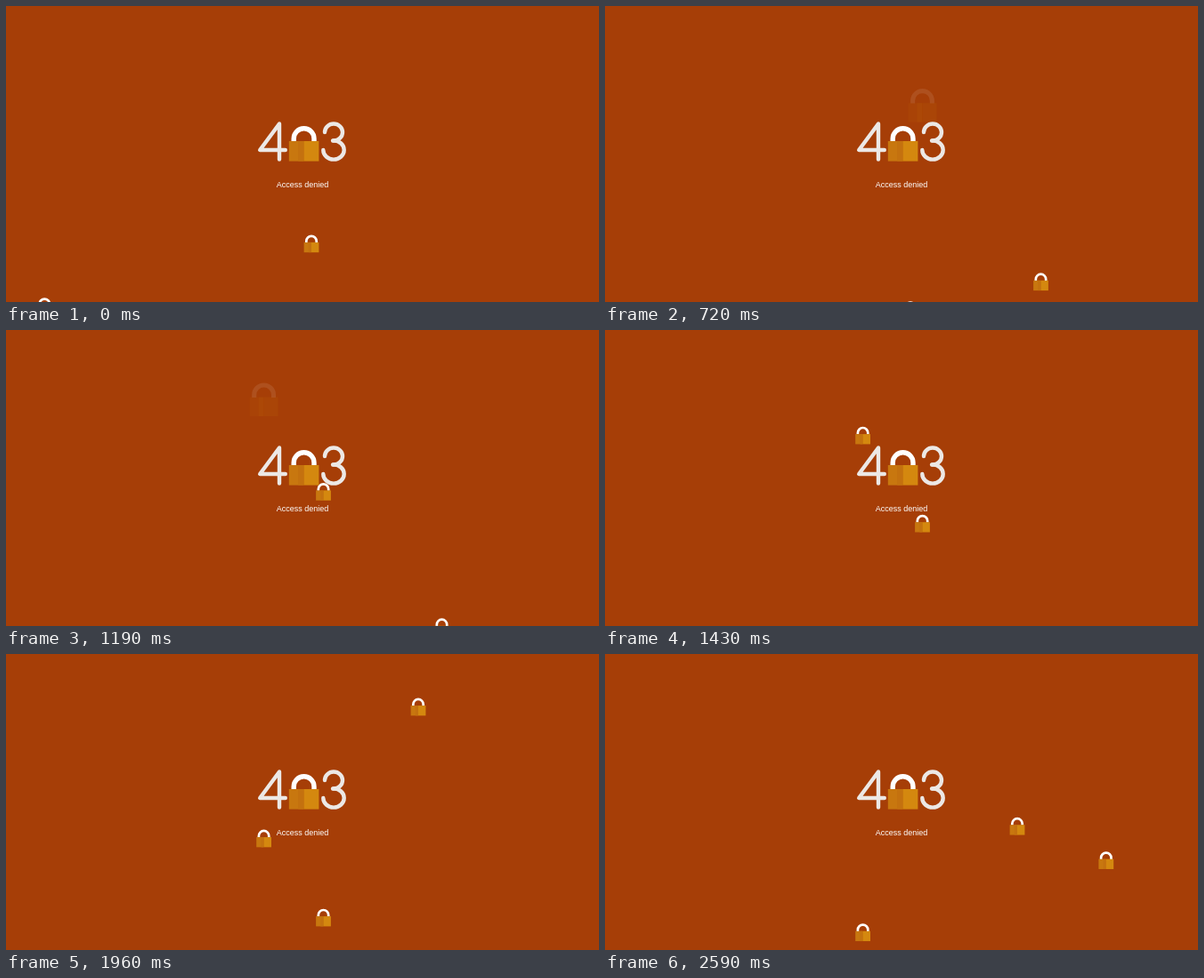
These frames come from a looping animation (666x333 px, 2.69 s). An HTML page with a canvas:

```html
<!DOCTYPE html>
<html lang="en">
<head>
<meta charset="utf-8">
<title>403</title>
<style>
  html, body { margin: 0; width: 100%; height: 100%; overflow: hidden; background: #a63e07; }
  canvas { display: block; }
</style>
</head>
<body>
<canvas id="stage" width="666" height="333"></canvas>
<script>
const ctx = document.getElementById('stage').getContext('2d');
const LOOP = 2690, FALL = 1800, FADE = 210, END_Y = 377;

// Each falling lock: spawn time in ms, centre x, starting centre y
const locks = [
  { born: -745, x: 343, y: 190 },
  { born: -250, x: 43.3, y: 332 },
  { born: 225, x: 489.5, y: 285 },
  { born: 700, x: 356.5, y: 109 },
  { born: 1170, x: 289.6, y: 75 },
  { born: 1650, x: 463, y: -6.5 },
  { born: 2120, x: 562.8, y: 181 }
];

function drawLock(x, y, scale, alpha = 1) {
  ctx.save();
  ctx.translate(x, y);
  ctx.scale(scale, scale);
  ctx.globalAlpha = alpha;

  ctx.strokeStyle = '#fff';
  ctx.lineWidth = 2.7;
  ctx.lineCap = 'butt';
  ctx.beginPath();
  ctx.moveTo(-5.7, -1.3);
  ctx.lineTo(-5.7, -2.9);
  ctx.arc(0, -2.9, 5.7, Math.PI, 0);
  ctx.lineTo(5.7, -1.3);
  ctx.stroke();

  const panel = (color, left, right) => {
    ctx.fillStyle = color;
    ctx.fillRect(left, -1.5, right - left, 11.3);
  };
  panel('#c8770f', -8.4, 0);
  panel('#c4710f', -3.2, 0);
  panel('#d4880f', 0, 8.4);
  ctx.restore();
}

function drawDigits() {
  ctx.strokeStyle = '#ece8e5';
  ctx.lineWidth = 4.4;
  ctx.lineCap = ctx.lineJoin = 'round';

  ctx.beginPath();
  ctx.moveTo(307, 172.5);
  ctx.lineTo(307, 132.5);
  ctx.lineTo(285.2, 162);
  ctx.lineTo(313.8, 162);
  ctx.stroke();

  ctx.beginPath();
  ctx.ellipse(368, 142, 10, 9.5, 0, Math.PI, Math.PI * 2.5);
  ctx.stroke();
  ctx.beginPath();
  ctx.moveTo(367, 151.5);
  ctx.ellipse(368, 162, 11.7, 10.6, 0, -Math.PI / 2, Math.PI);
  ctx.stroke();
}

function drawFalling(lock, time) {
  const age = time - lock.born;
  if (age < 0 || age > FALL) return;
  const shown = Math.min(age / FADE, 1);
  const y = lock.y + (END_Y - lock.y) * age / FALL;
  drawLock(lock.x, y, 2 - shown, shown);
}

function render(now) {
  const time = now % LOOP;
  ctx.fillStyle = '#a63e07';
  ctx.fillRect(0, 0, 666, 333);
  locks.forEach(lock => drawFalling(lock, time));
  drawDigits();
  drawLock(334.6, 155, 2);
  ctx.fillStyle = '#fff';
  ctx.font = '9px "Liberation Sans", Arial, sans-serif';
  ctx.textAlign = 'center';
  ctx.fillText('Access denied', 333, 204);
}

let start;
function tick(now) {
  start ??= now;
  render(now - start);
  requestAnimationFrame(tick);
}
render(0);
requestAnimationFrame(tick);
</script>
</body>
</html>
```
